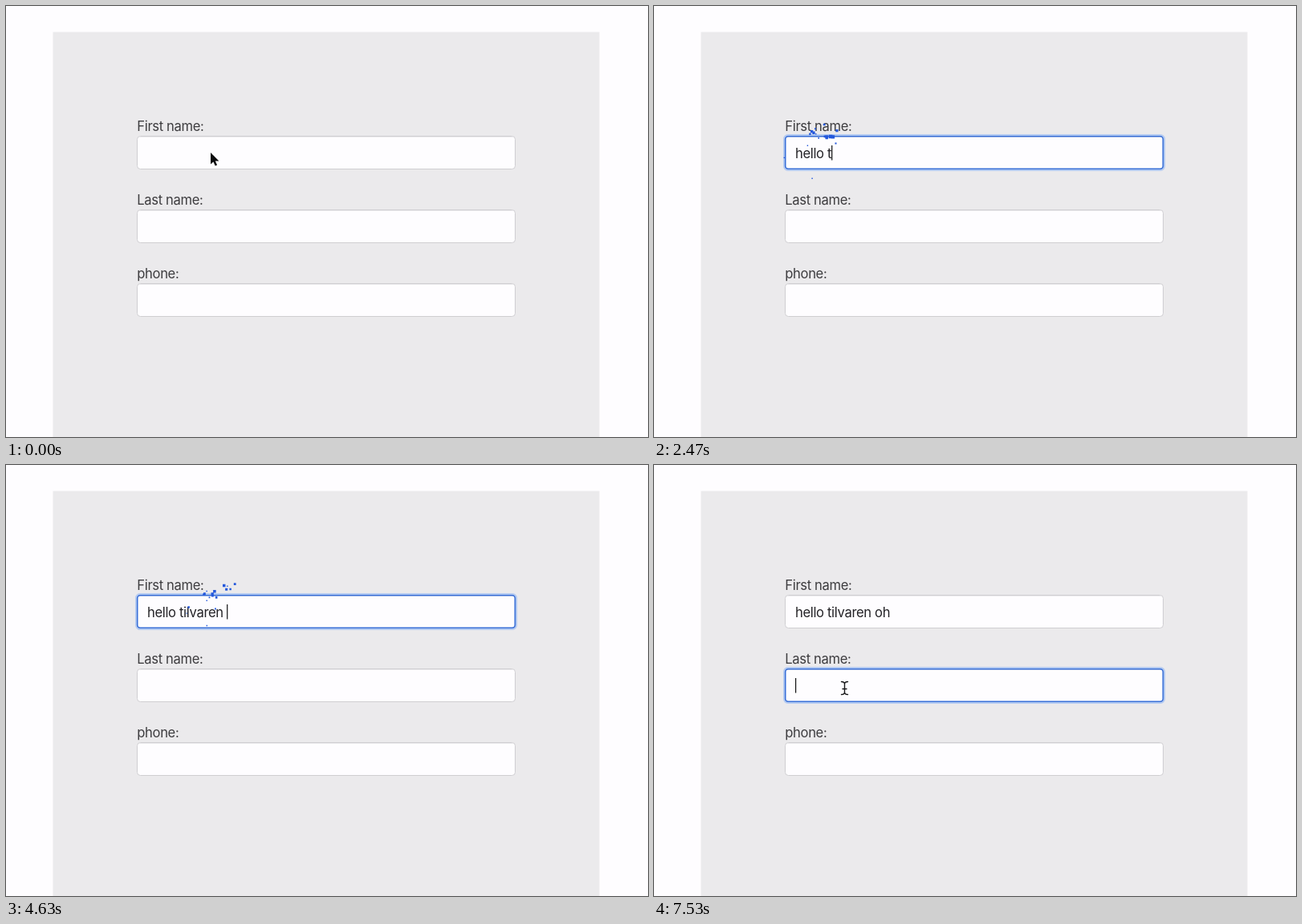
An HTML page for the animation above (8 s loop, 800 by 538 pixels).

```html
<!DOCTYPE html>
<html lang="en">
<head>
<meta charset="utf-8">
<title>Typing sparks</title>
<style>
  html, body { margin: 0; width: 100%; height: 100%; overflow: hidden; background: #fefdff; }
  svg { display: block; width: 800px; height: 538px; }
  text { font: 16.6px Inter, Roboto, sans-serif; letter-spacing: -0.35px; fill: #3d3c3f; }
  #typed { fill: #242327; }
</style>
</head>
<body>
<svg id="stage" viewBox="0 0 800 538" xmlns="http://www.w3.org/2000/svg">
  <rect width="800" height="538" fill="#fefdff"/>
  <rect x="58.5" y="32.5" width="681" height="506" fill="#ebeaec"/>
  <g id="fields"></g>
  <text id="typed" x="176" y="189.5"></text>
  <rect id="caret" width="1.2" height="18.5" fill="#111"/>
  <path id="sparks" fill="#2458dc"/>
  <path id="arrow" d="M0 0V14.6L3.4 11.4L5.7 16.6L8.1 15.5L5.8 10.5H10.4Z"
        fill="#0b0b0d" stroke="#fff" stroke-width="1" paint-order="stroke"/>
  <g id="beam" fill="none" stroke-linecap="round">
    <path d="M-4 -8Q0 -8 0 -5Q0 -8 4 -8M0 -5V5M-4 8Q0 8 0 5Q0 8 4 8M-2.5 1H2.5" stroke="#fff" stroke-width="3"/>
    <path d="M-4 -8Q0 -8 0 -5Q0 -8 4 -8M0 -5V5M-4 8Q0 8 0 5Q0 8 4 8M-2.5 1H2.5" stroke="#161618" stroke-width="1.4"/>
  </g>
</svg>
<script>
const LOOP = 8000;
const MESSAGE = "hello tilvaren oh";
const KEY_TIMES = [1030, 1200, 1420, 1620, 1850, 2110, 2420, 2750, 3000,
                   3250, 3510, 3780, 4000, 4200, 4350, 5530, 5950];
const FOCUS_FIRST = 530, FOCUS_LAST = 7470;
const TEXT_X = 176, GRAVITY = 200;

const $ = id => document.getElementById(id);
const typed = $("typed"), caret = $("caret"), sparks = $("sparks");
const arrow = $("arrow"), beam = $("beam");

function box(x, y, w, h, r, attrs) {
  return `<rect x="${x}" y="${y}" width="${w}" height="${h}" rx="${r}" ${attrs}/>`;
}

$("fields").innerHTML = ["First name:", "Last name:", "phone:"].map((label, i) => {
  const y = 162.5 + i * 92;
  return `<text x="163.3" y="${y - 6.5}">${label}</text>` +
    box(163.5, y, 471, 41, 4, 'fill="#fefdff" stroke="#cfced1"') +
    `<path d="M166 ${y + 1}H632" stroke="#eae9ec"/>` +
    `<g class="ring" fill="none">` +
    box(162.2, y - 1.3, 473.6, 43.6, 5, 'stroke="#b3caf1" stroke-width="2.4"') +
    box(163.7, y + .2, 470.6, 40.6, 3.5, 'stroke="#3a70d8" stroke-width="1.6"') + "</g>";
}).join("");
const rings = document.querySelectorAll(".ring");

typed.textContent = MESSAGE;
const caretAt = [...MESSAGE].map((_, i) => TEXT_X + typed.getSubStringLength(0, i + 1));

const random = seed => {
  const v = Math.sin(seed * 127.1 + 31.7) * 43758.5453;
  return v - Math.floor(v);
};
const show = (el, visible) => el.setAttribute("visibility", visible ? "visible" : "hidden");
const place = (el, x, y) => el.setAttribute("transform", `translate(${x.toFixed(2)} ${y.toFixed(2)})`);
const progress = (t, from, to) => {
  const p = Math.min(1, Math.max(0, (t - from) / (to - from)));
  return p * p * (3 - 2 * p);
};

// Each key throws up a few squares that shrink as they fall.
const particles = KEY_TIMES.flatMap((born, key) =>
  Array.from({ length: 4 + Math.floor(random(key + 1) * 3) }, (_, n) => {
    const rnd = k => random(key * 61 + n * 7 + k);
    return {
      born, x: caretAt[key] - 3 + (rnd(1) - .5) * 9, y: 167,
      vx: (rnd(2) - .54) * 96, vy: -95 + rnd(3) * 52,
      life: .65 + rnd(4) * .55, size: 3 + rnd(5) * 2
    };
  }));

function sparkPath(t) {
  return particles.map(p => {
    const age = (t - p.born) / 1000;
    if (age < 0 || age > p.life) return "";
    const s = Math.max(1.4, p.size * (1 - .75 * age / p.life));
    const x = p.x + p.vx * age - s / 2;
    const y = p.y + p.vy * age + GRAVITY / 2 * age * age - s / 2;
    return `M${x.toFixed(1)} ${y.toFixed(1)}h${s}v${s}h${-s}z`;
  }).join("");
}

function render(t) {
  const count = KEY_TIMES.filter(k => k <= t).length;
  const onLast = t >= FOCUS_LAST;
  typed.textContent = MESSAGE.slice(0, count);

  show(rings[0], t >= FOCUS_FIRST && !onLast);
  show(rings[1], onLast);
  show(rings[2], false);
  rings[1].setAttribute("opacity", t < 7530 ? .55 : 1);

  const lastAction = onLast ? FOCUS_LAST : count ? KEY_TIMES[count - 1] : FOCUS_FIRST;
  const blinkOn = t >= FOCUS_FIRST && Math.floor((t - lastAction) / 500) % 2 === 0;
  show(caret, blinkOn || t >= FOCUS_LAST);
  caret.setAttribute("x", onLast || !count ? TEXT_X : caretAt[count - 1]);
  caret.setAttribute("y", onLast ? 266 : 174);

  sparks.setAttribute("d", sparkPath(t));

  show(arrow, t < 200);
  place(arrow, 255, 183);
  const typing = t >= KEY_TIMES[0] && t < 6800;
  show(beam, t >= 200 && !typing);
  if (t < 6800) place(beam, 258, 190);
  else {
    const p = progress(t, 6840, 7270);
    place(beam, 230.5 + 7 * p, 251.5 + 27 * p);
  }
}

function tick() {
  render(performance.now() % LOOP);
  requestAnimationFrame(tick);
}
tick();
</script>
</body>
</html>
```
